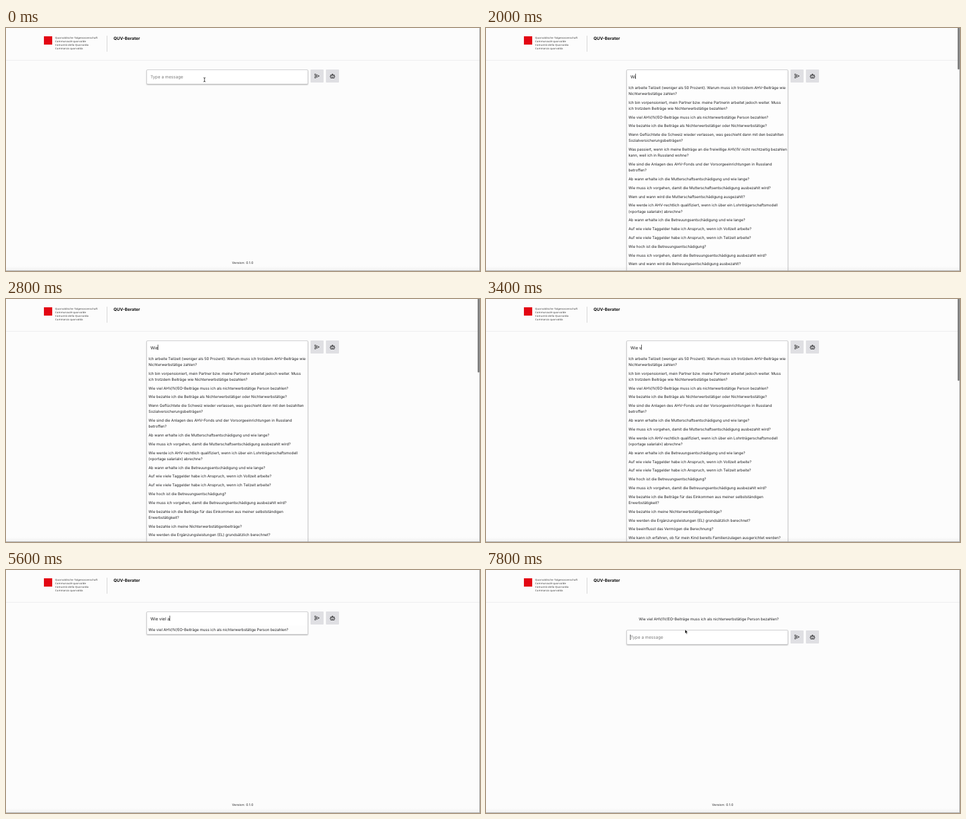
Write an HTML page that moves like this. It is 800 px wide and 410 px high and loops after 8000 ms.

```html
<!DOCTYPE html>
<html lang="de">
<head>
<meta charset="utf-8">
<title>Chat</title>
<style>
html, body { margin: 0; width: 100%; height: 100%; overflow: hidden; }
body { background: #fcfcfc; }
#stage {
  position: relative; width: 800px; height: 410px; overflow: hidden;
  background: #fcfcfc; color: #1d1d1f;
  font: 6.32px/10.1px Inter, "Open Sans", sans-serif;
  text-rendering: geometricPrecision; white-space: pre;
}
#stage div, #stage svg { position: absolute; }
.mark { left: 64px; top: 14px; width: 14px; height: 14px; background: #e30613; }
.owner {
  left: 83px; top: 14.5px; color: #2a2a2a; letter-spacing: .2px;
  font: 4.2px/6.17px "Noto Sans", sans-serif;
}
.split { left: 170px; top: 13px; width: 1px; height: 27px; background: #d2d2d2; }
.title { left: 181.5px; top: 13.4px; font-size: 7.15px; font-weight: 700; color: #111; }
.rule { left: 0; top: 54px; width: 100%; height: 1px; background: #ececed; }
#asked { left: 258px; top: 77.5px; }
#bar { left: 0; width: 800px; }
#box {
  left: 237px; top: 0; width: 271px; background: #fff; border: 1px solid #cdcdcf;
  border-radius: 2px; box-shadow: 0 1px 2px rgba(0, 0, 0, .28);
}
#stage #field { position: relative; height: 23px; font-size: 7.15px; line-height: 23px; }
#text, #hint { left: 5.7px; top: 0; }
#hint { color: #7b7b7b; }
#caret { display: inline-block; width: 1px; height: 9px; margin: 0 -1px 0 -.4px; vertical-align: -1.6px; background: #555; }
#stage #list div { position: relative; padding: 2.365px 2.5px; }
#stage #list { position: relative; background: #fdfdfd; }
.btn { top: .5px; width: 22px; height: 22px; border-radius: 1px; background: #dfdfe3; }
.btn svg { left: 0; top: 0; fill: none; stroke: #1d1d1f; stroke-width: .8; stroke-linejoin: round; }
#foot { left: 0; top: 392px; width: 799px; text-align: center; font-size: 5.36px; letter-spacing: .18px; }
.shade { left: 0; top: 402px; width: 100%; height: 7px; background: linear-gradient(transparent, rgba(0, 0, 0, .045)); }
.bottom { left: 0; top: 409px; width: 100%; height: 1px; background: #a9a9a9; }
.right { left: 799px; top: 0; width: 1px; height: 100%; background: #9c9c9c; }
#thumb { left: 796px; top: 0; width: 3px; border-radius: 0 0 2px 2px; background: #808080; }
#beam, #arrow { left: 0; top: 0; overflow: visible; }
</style>
</head>
<body>
<div id="stage"><div class="mark"></div><div class="owner">Quorvaldische Talgenossenschaft
Communauté quorvalde
Comunità della Quorvalda
Cuminanza quorvalda</div><div class="split"></div><div class="title">QUV-Berater</div><div class="rule"></div><div id="asked"></div><div id="foot">Version: 0.1.0</div><div id="bar"><div id="box"><div id="field"><div id="hint">Type a message</div><div id="text"><span id="typed"></span><span id="caret"></span></div></div><div id="list"></div></div><div class="btn" style="left:513.5px"><svg width="22" height="22"><path d="M7.3 7.4 14.8 11 7.3 14.6V12L11 11 7.3 10Z"/></svg></div><div class="btn" style="left:539.5px"><svg width="22" height="22"><path d="M8 9.5h6v5H8ZM7.2 9.5h7.6M11 9.5V7.4M9.7 8h2.6M7.2 11v2M14.8 11v2M9.9 10.8v1.3M12.1 10.8v1.3M9.5 13.2h3"/></svg></div></div><div class="shade"></div><div id="thumb"></div><div class="right"></div><div class="bottom"></div><svg id="beam" width="1" height="1"><path d="M333.3 83.8Q335 83.8 335 85Q335 83.8 336.7 83.8M335 84.6V90M333.3 90.8Q335 90.8 335 89.6Q335 90.8 336.7 90.8" fill="none" stroke="#222" stroke-width=".9"/></svg><svg id="arrow" width="1" height="1"><path d="M0 0V6.6L1.5 5.2 2.6 7.7 3.7 7.2 2.6 4.8H4.7Z" fill="#000" stroke="#fff" stroke-width=".5"/></svg></div>
<script>
const LOOP = 8000;
const SENT = 7400;
const QUESTIONS = [
  "Ich arbeite Teilzeit (weniger als 50 Prozent). Warum muss ich trotzdem AHV-Beiträge wie\nNichterwerbstätige zahlen?",
  "Ich bin vorpensioniert, mein Partner bzw. meine Partnerin arbeitet jedoch weiter. Muss\nich trotzdem Beiträge wie Nichterwerbstätige bezahlen?",
  "Wie viel AHV/IV/EO-Beiträge muss ich als nichterwerbstätige Person bezahlen?",
  "Wie bezahle ich die Beiträge als Nichterwerbstätiger oder Nichterwerbstätige?",
  "Wenn Geflüchtete die Schweiz wieder verlassen, was geschieht dann mit den bezahlten\nSozialversicherungsbeiträgen?",
  "Was passiert, wenn ich meine Beiträge an die freiwillige AHV/IV nicht rechtzeitig bezahlen\nkann, weil ich in Russland wohne?",
  "Wie sind die Anlagen des AHV-Fonds und der Vorsorgeeinrichtungen in Russland\nbetroffen?",
  "Ab wann erhalte ich die Mutterschaftsentschädigung und wie lange?",
  "Wie muss ich vorgehen, damit die Mutterschaftsentschädigung ausbezahlt wird?",
  "Wem und wann wird die Mutterschaftsentschädigung ausgezahlt?",
  "Wie werde ich AHV-rechtlich qualifiziert, wenn ich über ein Lohnträgerschaftsmodell\n(«portage salarial») abrechne?",
  "Ab wann erhalte ich die Betreuungsentschädigung und wie lange?",
  "Auf wie viele Taggelder habe ich Anspruch, wenn ich Vollzeit arbeite?",
  "Auf wie viele Taggelder habe ich Anspruch, wenn ich Teilzeit arbeite?",
  "Wie hoch ist die Betreuungsentschädigung?",
  "Wie muss ich vorgehen, damit die Betreuungsentschädigung ausbezahlt wird?",
  "Wem und wann wird die Betreuungsentschädigung ausbezahlt?",
  "Wie bezahle ich die Beiträge für das Einkommen aus meiner selbstständigen\nErwerbstätigkeit?",
  "Wie bezahle ich meine Nichterwerbstätigenbeiträge?",
  "Wie werden die Ergänzungsleistungen (EL) grundsätzlich berechnet?",
  "Wie beeinflusst das Vermögen die Berechnung?",
  "Wie kann ich erfahren, ob für mein Kind bereits Familienzulagen ausgerichtet werden?",
  "Auf wie viele Urlaubstage habe ich Anspruch, wenn ich Vollzeit arbeite?",
  "Auf wie viele Urlaubstage habe ich Anspruch, wenn ich Teilzeit arbeite?"
];

// [start, value] steps; a value holds until the next start
const TYPED = [[0, ""], [1600, "W"], [2000, "Wi"], [2400, "Wie"], [3000, "Wie "], [3400, "Wie v"],
  [3800, "Wie vi"], [4000, "Wie vie"], [4400, "Wie viel"], [5000, "Wie viel "],
  [5600, "Wie viel a"], [5800, "Wie viel ah"], [6000, "Wie viel ahv"], [SENT, ""]];
const QUERY = [[0, ""], [1800, "w"], [2200, "wi"], [2600, "wie"], [3200, "wie "],
  [3600, "wie v"], [5000, "wie viel "], [SENT, ""]];
const THUMB = [[0, 0], [1800, 70], [2200, 91], [2600, 124], [3200, 138], [3600, 0]];
const CARET = [[0, 0], [400, 1], [1000, 0], [1400, 1], [6600, 0], [7200, 1]];
const ARROW_Y = [[0, 0], [7600, 94], [7800, 100.5]];

const $ = id => document.getElementById(id);
const at = (steps, t) => steps.findLast(s => s[0] <= t)[1];
const show = (id, on) => { $(id).style.visibility = on ? "visible" : "hidden"; };

let shown = null;
function fillList(query) {
  if (query === shown) return;
  shown = query;
  const hits = query ? QUESTIONS.filter(q => q.replace("\n", " ").toLowerCase().includes(query)) : [];
  $("list").replaceChildren(...hits.map(q => {
    const row = document.createElement("div");
    row.textContent = q;
    return row;
  }));
}

function draw(t) {
  const text = at(TYPED, t), thumb = at(THUMB, t), arrowY = at(ARROW_Y, t), sent = t >= SENT;
  $("typed").textContent = text;
  fillList(at(QUERY, t));
  $("thumb").style.height = thumb + "px";
  $("bar").style.top = (sent ? 101 : 69.5) + "px";
  $("asked").textContent = sent ? QUESTIONS[2] : "";
  show("hint", !text);
  show("caret", at(CARET, t));
  show("foot", !thumb);
  show("beam", t < 1600);
  show("arrow", arrowY);
  $("arrow").style.transform = `translate(336px, ${arrowY}px)`;
}

const start = performance.now();
function tick() {
  draw((performance.now() - start) % LOOP);
  requestAnimationFrame(tick);
}
tick();
</script>
</body>
</html>
```
